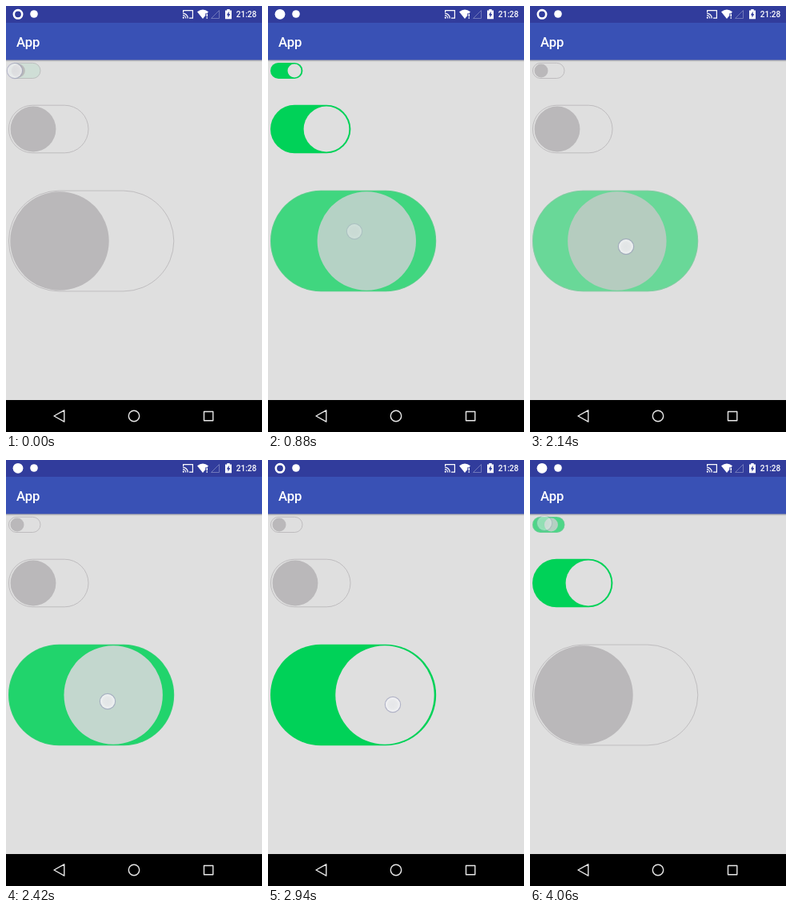
Animation, 320 px wide and 533 px high, one loop 4080 ms. Source, as an HTML page:

```html
<!DOCTYPE html>
<html lang="en">
<head>
<meta charset="utf-8">
<title>Switches</title>
<style>
  html, body { margin: 0; width: 100%; height: 100%; overflow: hidden; background: #dfdfdf; }
  svg { display: block; width: 100vw; height: 100vh; }
  text { font-family: Roboto, "Open Sans", sans-serif; font-weight: 500; fill: #fff; }
</style>
</head>
<body>
<svg id="stage" viewBox="0 0 320 533" preserveAspectRatio="none">
  <defs>
    <linearGradient id="shade" x1="0" y1="0" x2="0" y2="1">
      <stop offset="0" stop-color="#000" stop-opacity=".3"/>
      <stop offset="1" stop-color="#000" stop-opacity="0"/>
    </linearGradient>
    <radialGradient id="spot">
      <stop offset="0" stop-color="#e6e7ea"/>
      <stop offset=".6" stop-color="#e9eaec"/>
      <stop offset="1" stop-color="#f5f5f8"/>
    </radialGradient>
  </defs>
  <rect width="320" height="533" fill="#dfdfdf"/>
  <rect y="67" width="320" height="3" fill="url(#shade)"/>
  <rect width="320" height="67.5" fill="#3951b5"/>
  <rect width="320" height="21" fill="#313c9c"/>
  <text x="13" y="51" font-size="16.67">App</text>

  <!-- status bar -->
  <circle id="rec" cx="15" cy="10.3" stroke="#fff"/>
  <circle cx="35" cy="10" r="4.8" fill="#fff"/>
  <g fill="none" stroke="#fff" stroke-width="1.2">
    <path d="M221.6 8V5.6H233.4V15.2H229"/>
    <path d="M221 9.2a6.3 6.3 0 0 1 6.3 6.3M221 11.7a3.8 3.8 0 0 1 3.8 3.8"/>
  </g>
  <circle cx="221.8" cy="14.7" r="1.1" fill="#fff"/>
  <path d="M239 7.3Q246 1.8 253 7.3L251.3 9.3H249.3V12L246 16Z" fill="#fff"/>
  <path d="M250.5 9.8h1.5v3.4h-1.5zM250.5 14.2h1.5v1.5h-1.5z" fill="#fff"/>
  <path d="M256.5 15.5L266.5 5.5V15.5Z" fill="none" stroke="#7078bb"/>
  <path d="M274 5.4h2.3V4h3.4v1.4h2.3V16.3h-8z" fill="#fff"/>
  <path d="M278.7 6.8L275.8 11.5h1.7v3.3L280.3 10h-1.6z" fill="#313c9c"/>
  <text x="287.8" y="14" font-size="10">21:28</text>

  <g id="switches"></g>
  <g id="touch">
    <circle r="9.6" fill="none" stroke="#9a9cbb" stroke-opacity=".65" stroke-width="1.3"/>
    <circle r="9" fill="url(#spot)" fill-opacity=".9"/>
  </g>

  <!-- navigation bar -->
  <rect y="493" width="320" height="40" fill="#000"/>
  <g fill="none" stroke="#e8e8e8" stroke-width="1.4" stroke-linejoin="round">
    <path d="M60 513L72.8 505.8V520.2Z"/>
    <circle cx="160" cy="513" r="6.7"/>
    <rect x="247.5" y="507.5" width="11.3" height="11.3"/>
  </g>
</svg>
<script>
const LOOP = 4080, FLIP = 100, FADE = 120, LAG = 20;
const byId = id => document.getElementById(id);
const clamp = (v, lo = 0, hi = 1) => Math.min(hi, Math.max(lo, v));
const ease = x => .5 - .5 * Math.cos(Math.PI * clamp(x));
const mix = (a, b, k) => a + (b - a) * k;

function make(name, attrs, parent) {
  const el = document.createElementNS("http://www.w3.org/2000/svg", name);
  set(el, attrs);
  return parent.appendChild(el);
}
function set(el, attrs) {
  for (const k in attrs) el.setAttribute(k, attrs[k]);
}

// Stops are [position, ...values] in rising order.
function sample(stops, x) {
  const i = stops.findIndex(s => s[0] > x);
  if (i === 0) return stops[0].slice(1);
  if (i < 0) return stops[stops.length - 1].slice(1);
  const a = stops[i - 1], b = stops[i], k = (x - a[0]) / (b[0] - a[0]);
  return a.slice(1).map((v, n) => mix(v, b[n + 1], k));
}
const rgb = c => `rgb(${c.map(Math.round).join()})`;

const TRACK = [[0, 223, 223, 223], [1, 0, 210, 88]];
const THUMB = [
  [0, 186, 184, 186], [.1, 185, 187, 186], [.62, 180, 207, 192],
  [.72, 181, 210, 197], [.91, 202, 217, 210], [1, 223, 223, 223]
];

function addSwitch(right, cy, r, thumbR, off, on) {
  const g = make("g", {}, byId("switches"));
  const box = { x: 3, y: cy - r, width: right - 3, height: 2 * r, rx: r };
  const edge = { x: 3.4, y: cy - r + .4, width: right - 3.8, height: 2 * r - .8, rx: r - .4 };
  return {
    off, on,
    track: make("rect", box, g),
    edge: make("rect", { ...edge, fill: "none", stroke: "#b6b4b6", "stroke-width": .8 }, g),
    thumb: make("circle", { cy, r: thumbR }, g)
  };
}
const small = addSwitch(43.4, 80.9, 10, 8.5, 14, 33);
const medium = addSwitch(103.4, 154, 30.2, 28.4, 34, 73);
const large = addSwitch(210.2, 294, 63.3, 61.7, 67, 146);

// Taps: press, release, x, y, switch, resulting state.
const taps = [
  [-60, -17, 11, 81, small, 1],
  [220, 280, 64, 162, medium, 1],
  [760, 816, 108, 282, large, 1],
  [1200, 1250, 104, 290, large, 0],
  [1340, 1380, 64, 170, medium, 0],
  [1520, 1570, 22, 82, small, 0],
  [3400, 3460, 62, 160, medium, 1],
  [3940, 4000, 18, 79, small, 1]
];

// Finger path over the large switch: time, x, y.
const drag = [
  [2040, 70, 300], [2080, 88, 300], [2140, 120, 301], [2260, 158, 303],
  [2360, 150, 303], [2480, 104, 301], [2600, 72, 300], [2680, 64, 300],
  [2780, 76, 302], [2860, 118, 304], [2940, 156, 306], [3000, 162, 306],
  [3080, 130, 304], [3160, 68, 302], [3200, 62, 302]
];
const DRAG_IN = drag[0][0], DRAG_OUT = drag[drag.length - 1][0];

function stateOf(sw, t) {
  if (sw === large && t >= DRAG_IN) {
    const x = sample(drag, t - LAG)[0] - .5;
    return clamp((x - sw.off) / (sw.on - sw.off));
  }
  let p = 0;
  for (const [, release, , , target, to] of taps)
    if (target === sw && t >= release) p = mix(1 - to, to, ease((t - release) / FLIP));
  return p;
}

function drawSwitch(sw, p) {
  set(sw.track, { fill: rgb(sample(TRACK, p)) });
  set(sw.edge, { opacity: 1 - p });
  set(sw.thumb, { cx: mix(sw.off, sw.on, p), fill: rgb(sample(THUMB, p)) });
}

function drawTouch(t) {
  let x = 0, y = 0, alpha = 0;
  const show = (release, px, py) => {
    x = px;
    y = py;
    alpha = 1 - clamp((t - release) / FADE);
  };
  for (const [press, release, px, py] of taps) if (t >= press) show(release, px, py);
  if (t >= DRAG_IN && t < DRAG_OUT + FADE) show(DRAG_OUT, ...sample(drag, t));
  set(byId("touch"), { transform: `translate(${x} ${y})`, opacity: alpha });
}

function drawRec(t) {
  const solid = (t + 960) % 1560 < 780;
  set(byId("rec"), solid
    ? { r: 6.4, fill: "#fff", "stroke-width": 0 }
    : { r: 5.2, fill: "none", "stroke-width": 2.6 });
}

function render(t) {
  for (const sw of [small, medium, large]) drawSwitch(sw, stateOf(sw, t));
  drawTouch(t);
  drawRec(t);
}

let start;
function tick(now) {
  start ??= now;
  render((now - start) % LOOP);
  requestAnimationFrame(tick);
}
render(0);
requestAnimationFrame(tick);
</script>
</body>
</html>
```
